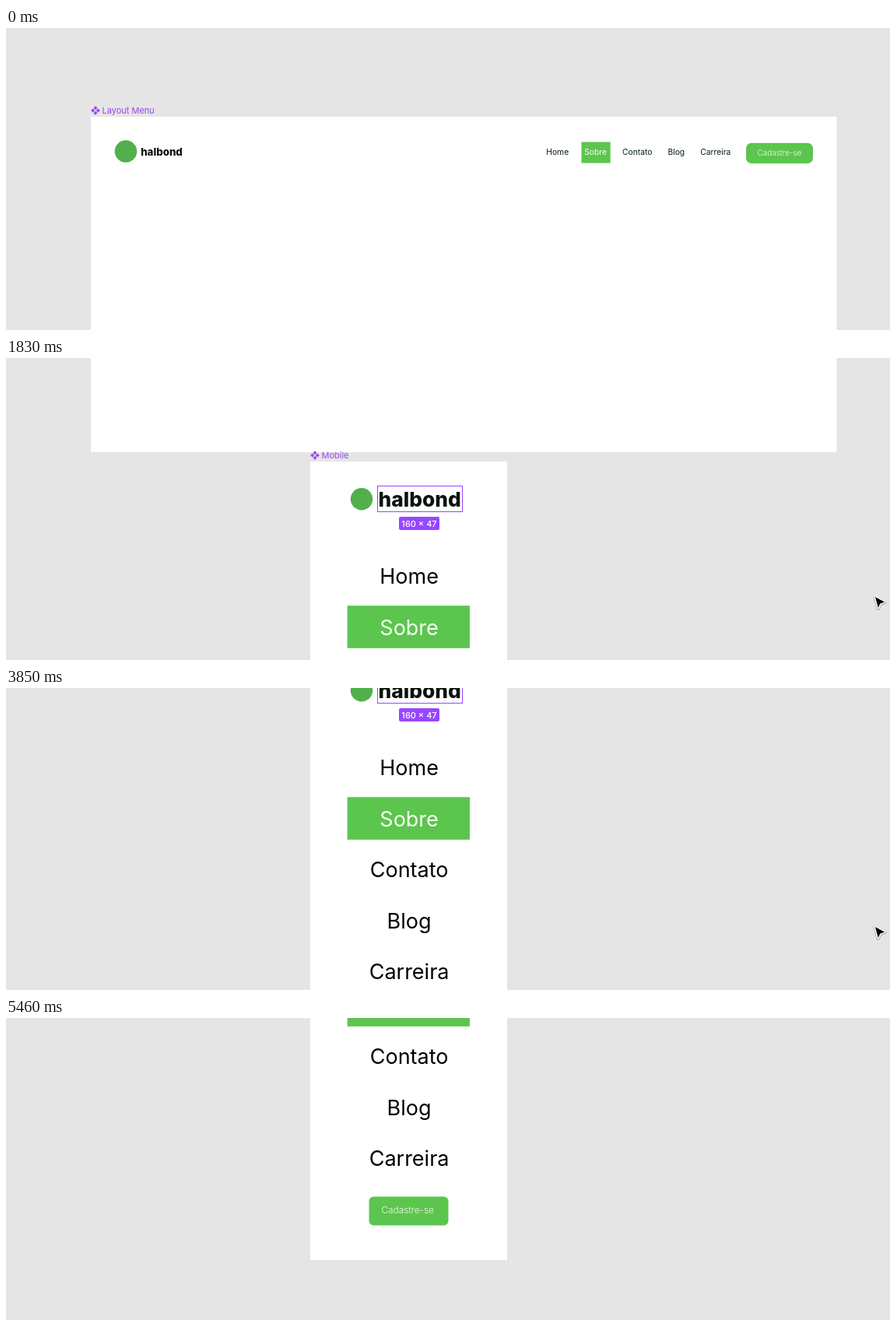
Write an HTML page that moves like this. It is 1136x388 px and loops after 5.79 s.

```html
<!DOCTYPE html>
<html lang="pt">
<head>
<meta charset="utf-8">
<title>Layout Menu</title>
<style>
  html, body { margin: 0; width: 100%; height: 100%; overflow: hidden; background: #e5e5e5; }
  svg { display: block; font-family: Inter, sans-serif; }
  .frame { fill: #fff; }
  .green { fill: #5cc54e; }
  .logo { fill: #52b04c; }
  .brand { font-weight: 800; fill: #0c130d; }
  .label { font-size: 11px; fill: #9747e6; }
  .mid { text-anchor: middle; }
  .nav { font-size: 10.3px; fill: #06200c; }
  .menu { font-size: 27px; fill: #000; }
  .on { fill: #f4fff0; }
  .cta { font-weight: 300; fill: #f0fbec; }
  .pick { fill: none; stroke: #9747ff; }
  .size { font-size: 11px; font-weight: 500; fill: #fff; }
  .arrow { stroke: #fff; stroke-width: 3; stroke-linejoin: round; paint-order: stroke; }
  .shade { stroke: #000; stroke-width: 4.4; stroke-linejoin: round; opacity: .28; }
</style>
</head>
<body>
<svg width="1136" height="388" viewBox="0 0 1136 388">
  <defs>
    <path id="mark" d="M0-5.8 2.5-3.3 0-.8-2.5-3.3zM0 .8 2.5 3.3 0 5.8-2.5 3.3zM-3.3-2.5-.8 0-3.3 2.5-5.8 0zM3.3-2.5 5.8 0 3.3 2.5 .8 0z"/>
    <path id="arrow" d="M1 1 13.2 7.4 7.4 9.4 4.8 15z"/>
  </defs>
  <g id="world">
    <use href="#mark" x="115" y="106" class="label"/>
    <text x="123.5" y="110" class="label">Layout Menu</text>
    <rect x="109" y="114" width="958.5" height="287" class="frame"/>
    <circle cx="154" cy="158.5" r="14.3" class="logo"/>
    <text x="200" y="164" class="brand mid" font-size="13.3">halbond</text>
    <rect x="739.5" y="146.5" width="37.2" height="27" class="green"/>
    <g id="nav"></g>
    <rect x="951" y="147.7" width="86" height="26.4" rx="7" class="green"/>
    <text x="994" y="164" class="cta mid" font-size="10">Cadastre-se</text>

    <use href="#mark" x="397" y="405" class="label"/>
    <text x="405.5" y="409" class="label">Mobile</text>
    <rect x="391" y="413" width="253" height="540" class="frame"/>
    <circle cx="457" cy="461.3" r="14.2" class="logo"/>
    <text x="531.7" y="471" class="brand mid" font-size="26.3">halbond</text>
    <rect x="477.5" y="444.5" width="109" height="33" class="pick"/>
    <rect x="505" y="484" width="52" height="17" rx="2" fill="#9747ff"/>
    <text x="531" y="496.5" class="size mid">160 × 47</text>
    <rect x="438.6" y="598.2" width="157.4" height="54.6" class="green"/>
    <g id="menu"></g>
    <rect x="466.5" y="871.5" width="102" height="37" rx="6" class="green"/>
    <text x="516.2" y="893" class="cta mid" font-size="11.8">Cadastre-se</text>
  </g>
  <g id="cursor">
    <use href="#arrow" y=".6" class="shade"/>
    <use href="#arrow" class="arrow"/>
  </g>
</svg>
<script>
  const LOOP = 5790, TICK = 70, NOTCH = 8;
  const $ = id => document.getElementById(id);
  const items = ["Home", "Sobre", "Contato", "Blog", "Carreira"];

  function addItems(id, place) {
    return items.map((word, i) => {
      const t = document.createElementNS("http://www.w3.org/2000/svg", "text");
      t.setAttribute("class", id + (i === 1 ? " on" : ""));
      t.textContent = word;
      $(id).append(t);
      place(t, i);
      return t;
    });
  }

  function put(t, x, y) {
    t.setAttribute("x", x);
    t.setAttribute("y", y);
  }

  addItems("menu", (t, i) => {
    t.classList.add("mid");
    put(t, 518.1, 570.2 + 65.5 * i);
  });

  // Header words share the row with equal gaps
  const left = 694.3, right = 931.4;
  const words = addItems("nav", () => {});
  const widths = words.map(t => t.getComputedTextLength());
  const gap = (right - left - widths.reduce((a, b) => a + b)) / (words.length - 1);
  words.reduce((x, t, i) => {
    put(t, x, 163.4);
    return x + widths[i] + gap;
  }, left);

  // Wheel gestures: small notches, then a glide spread over a few ticks
  const gestures = [
    { at: 630, notches: 4, every: 266, glide: 128 },
    { at: 1830, glide: 112 },
    { at: 1830, notches: 2, every: 400, glide: 40 },
    { at: 2830, notches: 3, every: 300, glide: 20 },
    { at: 3650, glide: 78, ticks: 2 },
    { at: 3850, notches: 3, every: 300, glide: 90, ticks: 2 },
    { at: 4790, notches: 1, glide: 70 }
  ];

  // How many of n evenly spaced steps have happened, the first one at start
  const count = (t, start, every, n) =>
    Math.max(0, Math.min(n, Math.floor((t - start) / every) + 1));

  function travel(t, { at, notches = 0, every = TICK, glide, ticks = 1 }) {
    const glideAt = notches ? at + (notches - 1) * every + TICK : at;
    return NOTCH * count(t, at, every, notches)
      + glide * count(t, glideAt, TICK, ticks) / ticks;
  }

  const scroll = t => gestures.reduce((sum, g) => sum + travel(t, g), 0);

  // Pointer strokes: it enters, settles at the right edge and drops out
  const strokes = [
    { at: 140, n: 8, from: [1062, 384], to: [1095, 336] },
    { at: 900, n: 8, from: [1095, 336], to: [1114, 302] },
    { at: 1500, n: 1, from: [1114, 302], to: [1116, 306] },
    { at: 5120, n: 5, from: [1116, 306], to: [1115, 400] }
  ];

  function pointer(t) {
    const s = strokes.filter(s => s.at <= t).pop();
    if (!s) return [0, -50];
    const p = count(t, s.at, TICK, s.n) / s.n;
    const ease = p * p * (3 - 2 * p);
    return s.from.map((v, i) => v + (s.to[i] - v) * ease);
  }

  function draw(t) {
    $("world").setAttribute("transform", `translate(0 ${-scroll(t)})`);
    $("cursor").setAttribute("transform", `translate(${pointer(t)})`);
  }

  const begin = performance.now();
  function tick() {
    draw((performance.now() - begin) % LOOP);
    requestAnimationFrame(tick);
  }
  tick();
</script>
</body>
</html>
```
